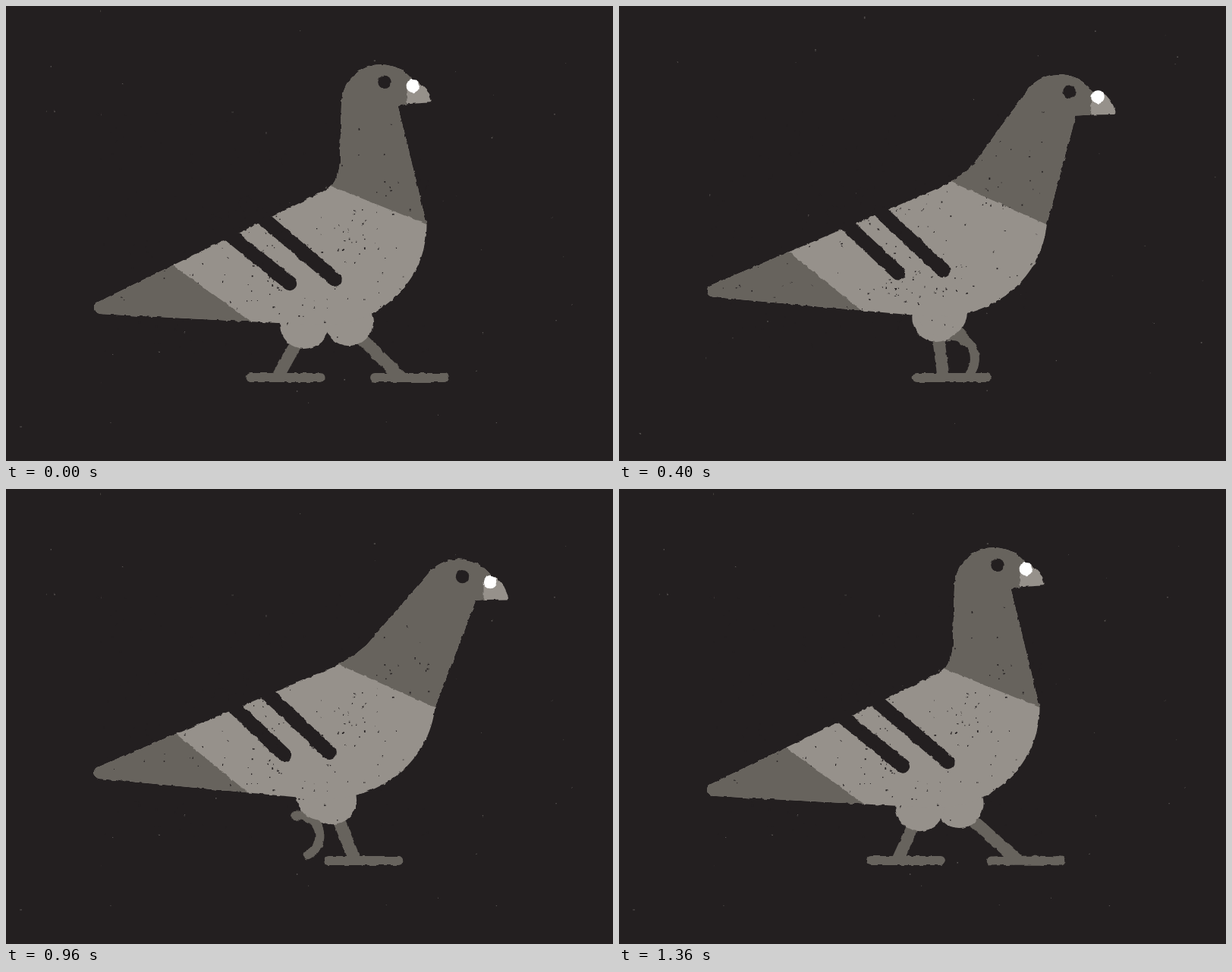
Animation, 800 px wide and 600 px high, one loop 1.4 s. Source, as an HTML page with a canvas:

```html
<!DOCTYPE html>
<html lang="en">
<head>
<meta charset="utf-8">
<title>Walking pigeon</title>
<style>
  html, body { margin: 0; width: 100%; height: 100%; overflow: hidden; background: #231f20; }
  canvas { display: block; }
  svg { position: absolute; width: 0; height: 0; }
</style>
</head>
<body>
<canvas id="stage" width="800" height="600"></canvas>
<svg aria-hidden="true"><defs id="filters"></defs></svg>
<script>
const canvas = document.getElementById('stage');
const ctx = canvas.getContext('2d');
const { PI, sin, cos } = Math;
const BG = '#231f20', LIGHT = '#96918b', DARK = '#67635d';
const LOOP = 1400, STEP = LOOP / 2, FRAME = 40, GRAIN_HOLD = 140;
const SEEDS = [3, 11, 27];

// Rough edges: one displacement filter per grain
document.getElementById('filters').innerHTML = SEEDS.map((seed, i) => `
  <filter id="rough${i}" x="0" y="0" width="100%" height="100%" color-interpolation-filters="sRGB">
    <feTurbulence type="fractalNoise" baseFrequency="0.16" numOctaves="1" seed="${seed}"/>
    <feDisplacementMap in="SourceGraphic" scale="4" xChannelSelector="R" yChannelSelector="G"/>
    <feGaussianBlur stdDeviation="0.45"/>
  </filter>`).join('');

function random(seed) {
  return () => {
    seed = (seed + 0x6D2B79F5) | 0;
    let n = Math.imul(seed ^ (seed >>> 15), 1 | seed);
    n = (n + Math.imul(n ^ (n >>> 7), 61 | n)) ^ n;
    return ((n ^ (n >>> 14)) >>> 0) / 4294967296;
  };
}

// Dark marks on the bird, some in clusters, and faint dust behind it
function makeGrain(seed) {
  const rnd = random(seed);
  const bell = spread => (rnd() + rnd() + rnd() - 1.5) * spread;
  const marks = [], dust = [];
  for (let i = 0; i < 190; i++) marks.push([120 + rnd() * 440, 140 + rnd() * 320, 0.9 + rnd()]);
  for (let c = 0; c < 3; c++) {
    const x = 330 + rnd() * 180, y = 280 + rnd() * 100;
    for (let i = 0; i < 18; i++) marks.push([x + bell(50), y + bell(35), 1 + rnd()]);
  }
  for (let i = 0; i < 40; i++) dust.push([9 + rnd() * 780, 5 + rnd() * 585, 0.7 + rnd()]);
  return { marks, dust };
}

const grains = SEEDS.map(makeGrain);

const clamp = x => Math.min(1, Math.max(0, x));
const smooth = (from, to, x) => {
  const u = clamp((x - from) / (to - from));
  return u * u * (3 - 2 * u);
};
const mix = (a, b, u) => [a[0] + (b[0] - a[0]) * u, a[1] + (b[1] - a[1]) * u];

function fillPoly(points, color) {
  ctx.beginPath();
  points.forEach(([x, y]) => ctx.lineTo(x, y));
  ctx.fillStyle = color;
  ctx.fill();
}

function fillCircle(x, y, r, color) {
  ctx.beginPath();
  ctx.arc(x, y, r, 0, PI * 2);
  ctx.fillStyle = color;
  ctx.fill();
}

function strokePoints(points, width, color, cap) {
  ctx.beginPath();
  points.forEach(([x, y]) => ctx.lineTo(x, y));
  ctx.lineWidth = width;
  ctx.strokeStyle = color;
  ctx.lineCap = cap;
  ctx.lineJoin = 'round';
  ctx.stroke();
}

function specks(list, color) {
  ctx.fillStyle = color;
  for (const [x, y, size] of list) ctx.fillRect(x - size / 2, y - size / 2, size, size);
}

// Thrust of the head, 0 to 1: forward, hold, back
const thrust = (phase, turn) => smooth(0, 260, phase) - smooth(turn, 617, phase);

// How far the tail hangs: steady lift, then an accelerating drop
const tailDrop = phase =>
  25 * (phase < 270 ? 1 - phase / 270 : clamp((phase - 270) / 400) ** 2);

// The foot is a circular arc around the ankle; it is flat and slides back in stance
function footPose(phase) {
  const front = 521, speed = 0.2335, back = front - speed * STEP;
  if (phase < STEP) return { x: front - speed * phase, y: 490, pitch: 0, curl: 0 };
  const s = (phase - STEP) / STEP;
  return {
    x: back + (front - back) * smooth(0, 1, s) - speed * STEP * s * (1 - s) * (1 - 2 * s) ** 3,
    y: 490 - 51 * sin(PI * clamp(s / 0.943)) ** 0.7,
    pitch: 1.28 * sin(PI * clamp(s / 0.82)) ** 1.4,
    curl: sin(PI * s ** 0.85) ** 2 * (s < 0.943),
  };
}

function footPoints({ x, y, pitch, curl }) {
  const ankle = 0.38, parts = 12, length = 92 - 14 * curl;
  const reachTo = end => {
    const points = [[x, y]], d = (end - ankle) / parts;
    for (let i = 0; i < parts; i++) {
      const angle = pitch + 3.05 * curl * (ankle + d * (i + 0.5) - 0.5);
      const [px, py] = points[i];
      points.push([px + length * d * cos(angle), py + length * d * sin(angle)]);
    }
    return points;
  };
  return [...reachTo(0).reverse(), ...reachTo(1)];
}

function drawLeg(phase, drop) {
  const behind = 1 - Math.abs(phase / STEP - 1);
  const lift = phase > STEP ? -6 * sin(PI * phase / STEP) : 0;
  const thigh = [452 - 59 * behind, 410 + drop * (0.25 + 0.15 * behind) - lift];
  const foot = footPose(phase);
  strokePoints([[thigh[0], thigh[1] + 6], [foot.x, foot.y]], 16, DARK, 'butt');
  strokePoints(footPoints(foot), 12, DARK, 'round');
  return thigh;
}

function drawBird(t) {
  const phase = t % STEP;
  const drop = tailDrop(phase);
  const reach = thrust(phase, 325);
  const eyeX = 499 + 102.5 * thrust(phase, 357);
  const eyeY = 100.3 + 15.2 * reach;
  const tilt = -0.05 * (1 - reach) ** 2;
  const onHead = (x, y) => [
    eyeX + x * cos(tilt) - y * sin(tilt),
    eyeY + x * sin(tilt) + y * cos(tilt),
  ];

  const thighs = [t, (t + STEP) % LOOP].map(legPhase => drawLeg(legPhase, drop));
  thighs.forEach(([x, y]) => fillCircle(x, y, 32, LIGHT));

  const tailY = 373 + drop;
  const nape = [438 - 0.32 * drop, 231 + 0.28 * drop];
  const chest = [554.5 + 11 * reach, 288];
  const belly = [416, 409 + 0.48 * drop];
  const skull = [494.5 + 102.5 * reach, eyeY + 29.5], skullR = 52.5;
  const neck = [440 + 35 * reach, 206];
  const dx = neck[0] - skull[0], dy = neck[1] - skull[1];
  const touch = Math.atan2(dy, dx) + Math.acos(skullR / Math.hypot(dx, dy));

  ctx.save();
  ctx.beginPath();
  ctx.arc(124, tailY, 8, 1.6, 4.25);
  ctx.lineTo(411 + 4 * reach, 248 - 6 * reach);
  ctx.quadraticCurveTo(439 + 11 * reach, 236 - 8 * reach, ...neck);
  ctx.arc(...skull, skullR, touch, PI * 2 - 0.62);
  ctx.lineTo(...onHead(37, 7));
  ctx.lineTo(...onHead(28, 8));
  ctx.lineTo(...onHead(28, 30.5));
  ctx.lineTo(skull[0] + 22, skull[1] + 2);
  ctx.lineTo(...chest);
  ctx.bezierCurveTo(chest[0] - 8 * reach, chest[1] + 0.56 * (belly[1] - chest[1]),
    belly[0] + 0.56 * (chest[0] - belly[0]), belly[1], ...belly);
  ctx.closePath();
  ctx.fillStyle = LIGHT;
  ctx.fill();
  ctx.clip();

  fillPoly([mix(nape, chest, -0.1), mix(nape, chest, 1.1), [800, 290], [800, 0], [nape[0] - 12, 0]], DARK);
  const tailTop = [224 - 0.16 * drop, 322 + 0.8 * drop];
  const tailEnd = [319, 400 + 0.52 * drop];
  fillPoly([[0, 0], mix(tailTop, tailEnd, -0.1), mix(tailTop, tailEnd, 1.1), [0, 600]], DARK);
  ctx.restore();

  // Wing bars slide along their length once per loop
  const slide = cos(t / LOOP * PI * 2);
  const bars = [
    [[303 - 0.15 * drop, 289 + 0.65 * drop], [369 + 5 * slide, 352 + 0.4 * drop + 4 * slide]],
    [[346 - 0.12 * drop, 271 + 0.5 * drop], [428.5 + 5 * slide, 349 + 0.3 * drop + 4 * slide]],
  ];
  for (const [top, end] of bars) strokePoints([mix(top, end, -0.3), end], 18.5, BG, 'round');

  ctx.beginPath();
  ctx.moveTo(...onHead(28, 8));
  ctx.lineTo(...onHead(42, 0));
  ctx.quadraticCurveTo(...onHead(57, 10), ...onHead(60.5, 28));
  ctx.lineTo(...onHead(59, 30));
  ctx.lineTo(...onHead(28, 30.5));
  ctx.fillStyle = LIGHT;
  ctx.fill();
  fillCircle(...onHead(37, 7), 8.7, '#fff');
  fillCircle(eyeX, eyeY, 8.7, BG);
}

let shownGrain = -1;
function render() {
  const t = Math.floor(performance.now() % LOOP / FRAME) * FRAME;
  const index = Math.floor(t / GRAIN_HOLD) % grains.length;
  if (index !== shownGrain) {
    canvas.style.filter = `url(#rough${index})`;
    shownGrain = index;
  }
  ctx.fillStyle = BG;
  ctx.fillRect(0, 0, 800, 600);
  specks(grains[index].dust, '#5a5654');
  drawBird(t);
  specks(grains[index].marks, BG);
  requestAnimationFrame(render);
}
render();
</script>
</body>
</html>
```
